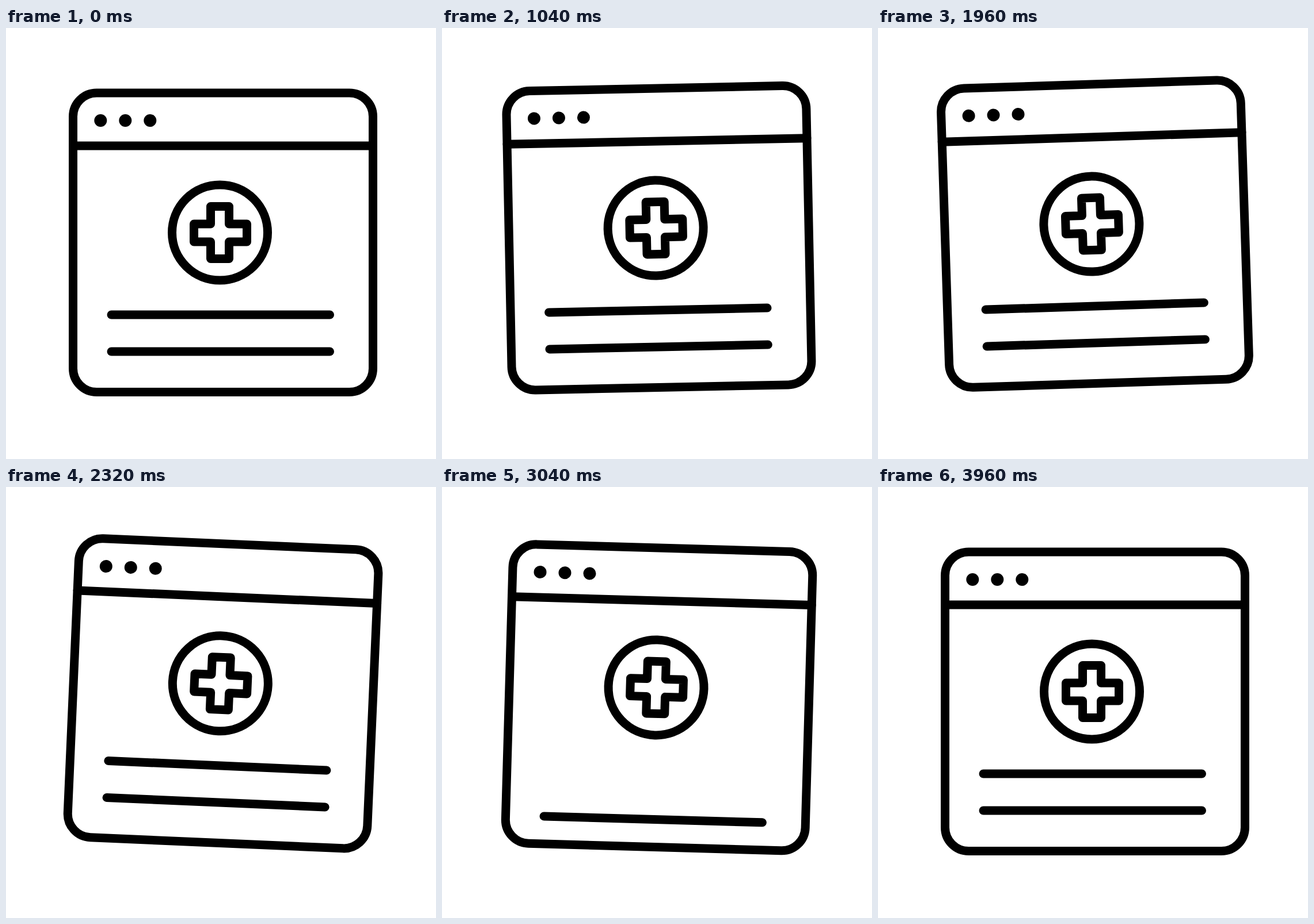
These frames come from a looping animation (747x750 px, 4 s). An HTML page:

```html
<!DOCTYPE html>
<html lang="en">
<head>
<meta charset="utf-8">
<title>Medical web page icon</title>
<style>
  html, body { margin: 0; width: 100%; height: 100%; overflow: hidden; background: #fff; }
  svg { display: block; width: 100%; height: 100%; }
  .outline { fill: none; stroke: #000; stroke-width: 15; stroke-linecap: round; stroke-linejoin: round; }
</style>
</head>
<body>
<svg viewBox="0 0 747 750">
  <clipPath id="inside"><rect x="116.5" y="113" width="521" height="520.5" rx="41"/></clipPath>
  <g id="page">
    <g class="outline">
      <g clip-path="url(#inside)">
        <path id="upperLine" d="M183 499H562.5"/>
        <path id="lowerLine" d="M183 563H562.5"/>
      </g>
      <rect x="116.5" y="113" width="521" height="520.5" rx="41"/>
      <path d="M116.5 205H637.5"/>
      <g id="badge">
        <circle cx="371.5" cy="356" r="83"/>
        <path d="M355.5 310.5h32v30.5h31v31h-31v29.5h-32v-29.5h-29v-31h29z"/>
      </g>
    </g>
    <circle cx="164.3" cy="161" r="11"/>
    <circle cx="207.3" cy="161" r="11"/>
    <circle cx="250.3" cy="161" r="11"/>
  </g>
</svg>
<script>
const LOOP = 4000;
const part = id => document.getElementById(id);

// Keys are [ms, value] pairs, joined with a smooth ease in and out.
const tilt = [[480, 0], [980, -1.6], [1400, 6], [1800, -5], [2200, 4],
              [2600, -3], [2965, 2], [3300, -0.8], [3520, 0]];
const pulse = [[0, 1], [360, 1.1], [720, 1]];
const upperDrop = [[40, 0], [200, 150], [500, 0],
                   [2480, 0], [2800, 150], [2900, 150], [3212, 0]];
const lowerDrop = [[0, 0], [180, 90], [400, 90], [732, 0],
                   [2400, 0], [2640, 90], [3080, 90], [3400, 0]];

function valueAt(keys, t) {
  const next = keys.findIndex(([time]) => time > t);
  if (next < 0) return keys[keys.length - 1][1];
  if (next === 0) return keys[0][1];
  const [t0, from] = keys[next - 1];
  const [t1, to] = keys[next];
  const u = (t - t0) / (t1 - t0);
  return from + (to - from) * u * u * (3 - 2 * u);
}

function draw(now) {
  const t = now % LOOP;
  const lift = -7.5 * (1 - Math.cos(2 * Math.PI * t / LOOP));
  const move = (id, transform) => part(id).setAttribute('transform', transform);

  move('page', `translate(0 ${lift}) rotate(${valueAt(tilt, t)} 373.5 375)`);
  move('badge', `translate(371.5 356) scale(${valueAt(pulse, t)}) translate(-371.5 -356)`);
  move('upperLine', `translate(0 ${valueAt(upperDrop, t)})`);
  move('lowerLine', `translate(0 ${valueAt(lowerDrop, t)})`);
}

let start;
function tick(now) {
  start ??= now;
  draw(now - start);
  requestAnimationFrame(tick);
}
draw(0);
requestAnimationFrame(tick);
</script>
</body>
</html>
```
